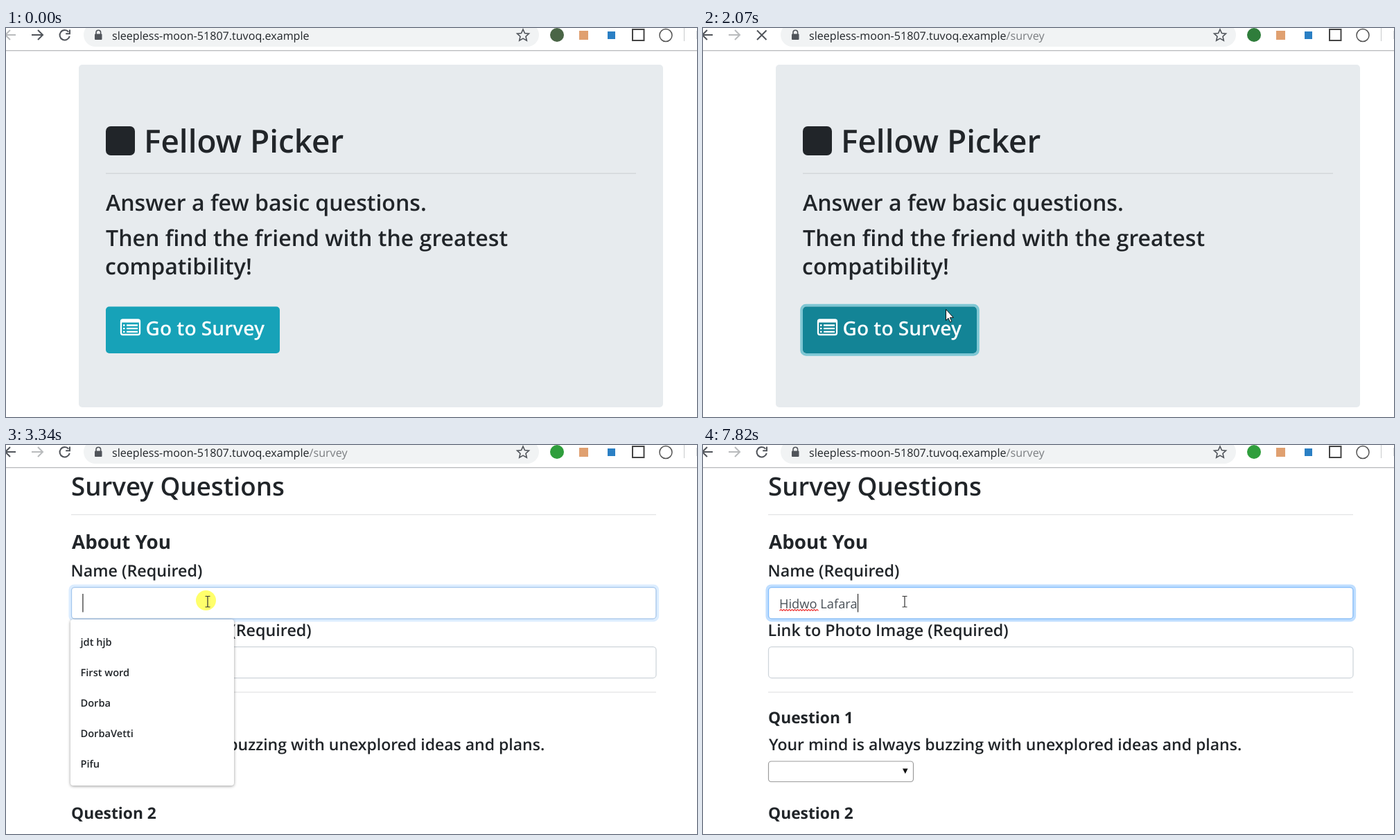
These frames come from a looping animation (997x562 px, 8 s). An HTML page:

```html
<!DOCTYPE html>
<html lang="en">
<head>
<meta charset="utf-8">
<title>Survey walkthrough</title>
<style>
  html, body { margin: 0; width: 100%; height: 100%; overflow: hidden; background: #fff; }
  svg { display: block; width: 997px; height: 562px; }
  text { font-family: "Open Sans", "Noto Sans", sans-serif; fill: #212529; white-space: pre; text-rendering: geometricPrecision; }
  .semi { font-weight: 600; }
  .bold { font-weight: 700; }
  .lead { font-size: 32.1px; }
  .label { font-size: 23.3px; }
  .prompt { font-size: 23px; }
  .question { font-size: 22.8px; }
  .address { font-size: 16.1px; }
  .option { font-size: 14.6px; }
  .line { fill: none; stroke-width: 2; }
  .field { fill: #fff; stroke: #ced4da; stroke-width: 1.25; }
  .menu { filter: drop-shadow(0 1px 2px rgba(0, 0, 0, .4)); }
</style>
</head>
<body>
<svg viewBox="0 0 997 562">
  <g id="home">
    <rect x="105" y="53" width="843" height="495" rx="5" fill="#e7ebee"/>
    <rect x="144" y="142" width="42" height="42" rx="7" fill="#212529"/>
    <text class="semi" x="199" y="179.5" font-size="45.9">Fellow Picker</text>
    <path d="M144 210H909" stroke="#cfd3d6" stroke-width="1.25"/>
    <g class="semi lead">
      <text x="144" y="264">Answer a few basic questions.</text>
      <text x="144" y="315">Then find the friend with the greatest</text>
      <text x="143" y="356">compatibility!</text>
    </g>
    <rect id="buttonRing" x="142.1" y="400.6" width="254.8" height="71.3" rx="6.5" fill="none" stroke="#3ab0c3" stroke-opacity=".6" stroke-width="3.75"/>
    <rect id="button" x="144" y="402.5" width="251" height="67.5" rx="5"/>
    <g stroke="#fff" fill="none">
      <rect x="166" y="421.5" width="27" height="21.5" rx="2.5" stroke-width="2.3"/>
      <path d="M166 423.5H193" stroke-width="4"/>
      <path d="M169 429.5h2.5m2.5 0h16M169 434.2h2.5m2.5 0h16M169 438.9h2.5m2.5 0h16" stroke-width="2.3"/>
    </g>
    <text class="semi" x="201.5" y="443.5" font-size="28.1" style="fill:#fff">Go to Survey</text>
  </g>

  <g id="survey">
    <text class="semi" x="94" y="73" font-size="36.7">Survey Questions</text>
    <path d="M94 100.5H938M94 357H938" stroke="#e3e4e5" stroke-width="1.25"/>
    <text class="bold" x="95" y="150" font-size="27.8">About You</text>
    <g class="semi label">
      <text x="93.5" y="190">Name (Required)</text>
      <text x="93.5" y="276">Link to Photo Image (Required)</text>
    </g>
    <g class="semi prompt">
      <text x="95" y="441">Your mind is always buzzing with unexplored ideas and plans.</text>
      <text x="94" y="579.5">Generally speaking, you rely more on your experience than your imagination.</text>
    </g>
    <g class="bold question">
      <text x="94" y="402">Question 1</text>
      <text x="94" y="540">Question 2</text>
    </g>
    <rect class="field" x="94.5" y="291.5" width="843.5" height="45" rx="4.5"/>
    <rect x="94.5" y="457" width="209" height="29.5" rx="4" fill="#fff" stroke="#9b9b9b" stroke-width="1.2"/>
    <path d="M288 467.5h7.6l-3.8 7.5z" fill="#111"/>
    <rect class="field" x="94.5" y="205.5" width="843.5" height="45.5" rx="4.5"/>
    <g id="fieldFocus">
      <rect x="92.3" y="203.3" width="848" height="50" rx="6" fill="none" stroke="#bfdeff" stroke-width="3.75"/>
      <rect x="94.5" y="205.5" width="843.5" height="45.5" rx="4.5" fill="none" stroke="#80bdff" stroke-width="1.25"/>
    </g>
    <text id="typed" x="110" y="236" font-size="18.3" style="fill:#495057"></text>
    <path id="squiggle" fill="none" stroke="#e33" stroke-width="1.1"/>
    <rect id="caret" y="215" width="1.25" height="26.5" fill="#333"/>
    <g id="menu">
      <rect class="menu" x="93" y="252" width="236" height="240" rx="4" fill="#fff"/>
      <g class="semi option" id="options"></g>
    </g>
  </g>

  <g id="toolbar">
    <rect width="997" height="33" fill="#fff"/>
    <rect y="32" width="997" height="1.3" fill="#b8babc"/>
    <rect x="112" y="-7" width="657" height="34" rx="17" fill="#f1f3f4"/>
    <path id="back" class="line" d="M14 10H-1M6 3L-1 10L6 17"/>
    <path id="forward" class="line" d="M37 10H53M46 3L53 10L46 17"/>
    <g class="line" stroke="#50545a">
      <path id="reload" d="M90.3 5.6A7.2 7.2 0 1 0 91.8 11.8M92 2.5V8.3H86.2"/>
      <path id="stop" d="M78 3.5L91.5 17M91.5 3.5L78 17"/>
      <path d="M130 9V6.5a3.3 3.3 0 0 1 6.6 0V9" stroke-width="1.6"/>
      <path d="M746 2l2.5 5.6 6 .6-4.5 4 1.3 6-5.3-3.1-5.3 3.1 1.3-6-4.5-4 6-.6z" stroke-width="1.6"/>
    </g>
    <rect x="128" y="8.5" width="10.5" height="8.5" rx="1" fill="#50545a"/>
    <text class="address" x="153" y="16.5">sleepless-moon-51807.tuvoq.example<tspan id="path" style="fill:#7a7d80">/survey</tspan></text>
    <circle id="badge" cx="795" cy="10" r="10"/>
    <rect x="827" y="4" width="13" height="13" fill="#e0a070"/>
    <rect x="868" y="5" width="11" height="11" fill="#2a7fc4"/>
    <rect x="904" y="2" width="16.5" height="16" fill="none" stroke="#444" stroke-width="2"/>
    <circle cx="952" cy="10.5" r="9" fill="none" stroke="#555" stroke-width="1.5"/>
    <path d="M978.5 0V19" stroke="#c9cbcd"/>
    <path d="M996.5 4V16" stroke="#dadcde"/>
  </g>

  <circle id="click" r="14.5" fill="#ffff6b"/>
  <g id="pointer" stroke-linejoin="round">
    <path id="arrow" d="M.5 .5V16.5L4 13.2L6.5 18.8L8.8 17.8L6.4 12.3H11.3Z" fill="#fff" stroke="#111"/>
    <path id="hand" d="M-1.6 1.8C-1.6 -.3 1.4 -.3 1.4 1.8V8C2.5 7 4 7.2 4.2 8.6C5 7.8 6.8 8 7 9.4C8 8.8 9.8 9.2 9.8 11V15C9.8 18 8.2 19 8.2 22H-.3C-1 19.5 -4.6 16.5 -5.3 13.8C-5.5 11.8 -3.2 11.6 -1.6 13.8ZM1.4 8V12M4.2 8.6V12.3M7 9.4V12.5" fill="#fff" stroke="#111" stroke-width="1.1"/>
    <path id="beam" d="M-3.5 -7.5H-1L0 -7L1 -7.5H3.5M0 -7V7.5M-3.5 8H-1L0 7.5L1 8H3.5" fill="none" stroke="#333" stroke-width="1.2"/>
  </g>
</svg>
<script>
const LOOP = 8000;
const $ = id => document.getElementById(id);
const show = (id, on) => { $(id).style.display = on ? '' : 'none'; };
const ramp = (t, start, length) => Math.min(1, Math.max(0, (t - start) / length));
const between = (t, start, end) => t >= start && t < end;
const latest = (rows, t) => rows.filter(row => row[0] <= t).pop();

// time, x, y, shape
const pointerSteps = [
  [130, 728, 545, 'arrow'], [210, 650, 492, 'arrow'], [290, 575, 441, 'arrow'], [360, 534, 420, 'arrow'],
  [760, 515, 421, 'arrow'], [840, 463, 424, 'arrow'], [920, 405, 427, 'arrow'],
  [990, 368, 429, 'hand'], [1070, 347, 429, 'hand'], [1140, 337, 428, 'hand'],
  [2010, 343, 420, 'arrow'], [2070, 350, 406, 'arrow'], [2150, 357, 390, 'arrow'], [2230, 359, 370, 'arrow'],
  [2310, 352, 345, 'arrow'], [2390, 338, 318, 'arrow'], [2470, 322, 292, 'arrow'], [2550, 308, 270, 'arrow'],
  [2640, 298, 257, 'arrow'], [2720, 292, 248, 'beam'], [2790, 289.5, 246, 'beam'],
  [2850, 289.5, 240, 'beam'], [2920, 290, 232, 'beam'], [3000, 291, 226, 'beam']
];
const badgeSteps = [[0, '#4a6546'], [2010, '#2f7d3b'], [2640, '#2f9e3c']];
const fullName = 'Hidwo Lafara';
const keyTimes = [4240, 4410, 4560, 5190, 5340, 5880, 6530, 6760, 7060, 7230, 7590, 7820];

$('options').innerHTML = ['jdt hjb', 'First word', 'Dorba', 'DorbaVetti', 'Pifu']
  .map((word, i) => `<text x="107.5" y="${290 + 44 * i}">${word}</text>`).join('');

function drawPointer(t) {
  const step = latest(pointerSteps, t);
  show('pointer', step);
  if (!step) return;
  const [, x, y, shape] = step;
  $('pointer').setAttribute('transform', `translate(${x} ${y})`);
  for (const name of ['arrow', 'hand', 'beam']) show(name, name === shape);
}

function drawClick(t) {
  const onButton = between(t, 1450, 1680);
  show('click', onButton || between(t, 3260, 3550));
  $('click').setAttribute('transform', onButton ? 'translate(335 428)' : 'translate(288.5 224.5)');
}

function drawHome(t) {
  const hover = ramp(t, 960, 150);
  const blend = (from, to) => Math.round(from + (to - from) * hover);
  $('button').setAttribute('fill', `rgb(${blend(23, 19)},${blend(162, 132)},${blend(184, 150)})`);
  $('buttonRing').style.opacity = ramp(t, 1450, 150);
}

function drawSurvey(t) {
  const count = keyTimes.filter(time => time <= t).length;
  const typed = $('typed');
  typed.textContent = fullName.slice(0, count);
  $('fieldFocus').style.opacity = ramp(t, 3260, 150);
  show('menu', between(t, 3300, 4240));

  const end = 110 + (count ? typed.getComputedTextLength() : 0);
  $('caret').setAttribute('x', end + .3);
  const lastKey = count ? keyTimes[count - 1] : 3260;
  show('caret', t >= 3260 && t - lastKey < 520);

  show('squiggle', count > 5);
  if (count > 5) {
    const waves = Math.round(typed.getSubStringLength(0, 5) / 4);
    $('squiggle').setAttribute('d', 'M110.5 239.5' + 'l2 -2l2 2'.repeat(waves));
  }
}

function drawToolbar(t) {
  const moved = t >= 2010;
  const loading = between(t, 1840, 2470);
  $('back').setAttribute('stroke', moved ? '#50545a' : '#b9bbbd');
  $('forward').setAttribute('stroke', moved ? '#b9bbbd' : '#50545a');
  show('reload', !loading);
  show('stop', loading);
  show('path', moved);
  $('badge').setAttribute('fill', latest(badgeSteps, t)[1]);
}

function draw() {
  const t = performance.now() % LOOP;
  const onSurvey = t >= 2150;
  show('home', !onSurvey);
  show('survey', onSurvey);
  if (onSurvey) drawSurvey(t); else drawHome(t);
  drawToolbar(t);
  drawClick(t);
  drawPointer(t);
  requestAnimationFrame(draw);
}
draw();
</script>
</body>
</html>
```
